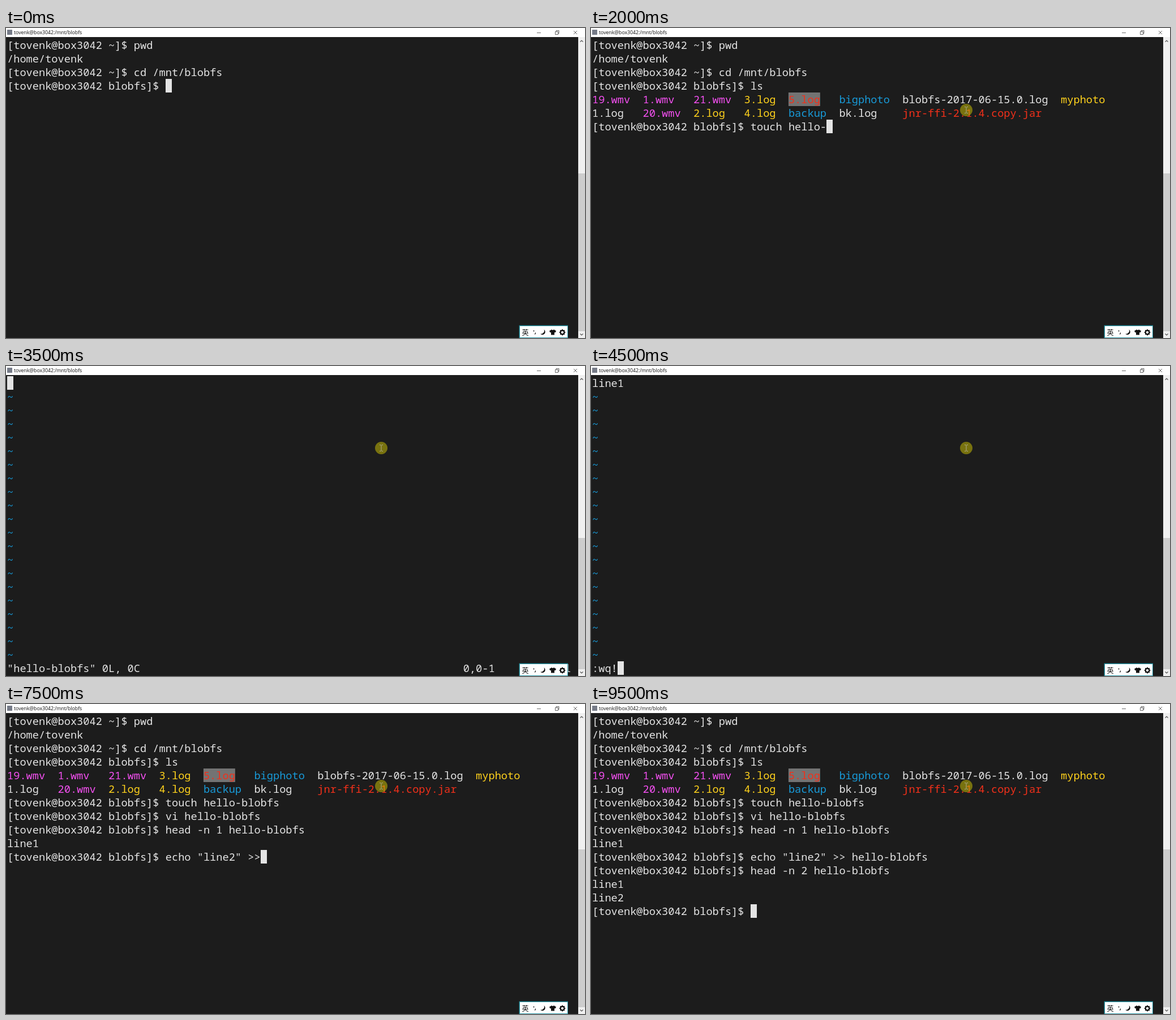
Recreate the animation shown at these times as an HTML page with a canvas. Size 1023 by 548 pixels, loop 10 s.

```html
<!DOCTYPE html>
<html lang="en">
<head>
<meta charset="utf-8">
<title>Terminal session</title>
<style>
html, body { margin: 0; width: 100%; height: 100%; overflow: hidden; background: #1c1c1c; }
canvas { display: block; }
</style>
</head>
<body>
<canvas id="stage" width="1023" height="548"></canvas>
<script>
const ctx = document.getElementById('stage').getContext('2d');

const STEP = 500, LEFT = 2, TOP = 18, CELL = 11.19, ROW = 24;
const FG = '#e4e4e4', BG = '#1c1c1c', PINK = '#f550f2', GOLD = '#ffd21c', BLUE = '#189ad8', RED = '#f2301a';
const HOST = 'tovenk@box3042';
const HOME_PROMPT = `[${HOST} ~]$ `, PROMPT = `[${HOST} blobfs]$ `;

// A row is a string or a list of [column, text, colour, background].
const session = [
  HOME_PROMPT + 'pwd',
  '/home/tovenk',
  HOME_PROMPT + 'cd /mnt/blobfs',
  PROMPT + 'ls',
  [[0, '19.wmv', PINK], [8, '1.wmv', PINK], [16, '21.wmv', PINK], [24, '3.log', GOLD],
   [31, '5.log', RED, '#737373'], [39, 'bigphoto', BLUE], [49, 'blobfs-2017-06-15.0.log'], [74, 'myphoto', GOLD]],
  [[0, '1.log'], [8, '20.wmv', PINK], [16, '2.log', GOLD], [24, '4.log', GOLD],
   [31, 'backup', BLUE], [39, 'bk.log'], [49, 'jnr-ffi-2.1.4.copy.jar', RED]],
  PROMPT + 'touch hello-blobfs',
  PROMPT + 'vi hello-blobfs',
  PROMPT + 'head -n 1 hello-blobfs',
  'line1',
  PROMPT + 'echo "line2" >> hello-blobfs',
  PROMPT + 'head -n 2 hello-blobfs',
  'line1',
  'line2'
];

const shell = (rows, input) => ({ rows, line: PROMPT + input });
const editor = (text, status, ruler, cursor) => ({ text, status, ruler, cursor });

const steps = [
  shell(3, ''),
  shell(6, ''),
  shell(6, ''),
  shell(6, 'touch '),
  shell(6, 'touch hello-'),
  shell(7, ''),
  shell(7, 'vi hello-blobfs'),
  editor('', '"hello-blobfs" 0L, 0C', '0,0-1', [0, 0]),
  editor('line1', '-- INSERT --', '1,6', [5, 0]),
  editor('line1', ':wq!', '', [4, 21]),
  shell(8, 'head -n 1 '),
  { rows: 9, line: '' },
  shell(10, ''),
  shell(10, 'echo '),
  shell(10, 'echo "line2'),
  shell(10, 'echo "line2" >>'),
  shell(10, 'echo "line2" >> hello-blobfs'),
  shell(11, 'head '),
  shell(11, 'head -n 2 hello-blobfs'),
  shell(14, '')
];

function rect(x, y, w, h, color) {
  ctx.fillStyle = color;
  ctx.fillRect(x, y, w, h);
}

function path(d, color, width) {
  const shape = new Path2D(d);
  ctx.lineWidth = width;
  ctx.strokeStyle = ctx.fillStyle = color;
  width ? ctx.stroke(shape) : ctx.fill(shape);
}

function circle(x, y, r, color) {
  ctx.fillStyle = color;
  ctx.beginPath();
  ctx.arc(x, y, r, 0, 2 * Math.PI);
  ctx.fill();
}

function label(text, x, y, font, color) {
  ctx.font = font;
  ctx.fillStyle = color;
  ctx.fillText(text, x, y);
}

function print(col, row, text, color = FG, back) {
  const x = LEFT + col * CELL, y = TOP + row * ROW;
  if (back) rect(x, y, text.length * CELL, ROW, back);
  [...text].forEach((ch, i) =>
    label(ch, x + i * CELL, y + 19, '18.65px "Noto Sans Mono", monospace', color));
}

function cursor(col, row) {
  rect(Math.round(LEFT + col * CELL), TOP + row * ROW, 11, ROW, FG);
}

function drawShell({ rows, line }) {
  session.slice(0, rows).forEach((content, row) => {
    if (typeof content === 'string') print(0, row, content);
    else content.forEach(([col, ...rest]) => print(col, row, ...rest));
  });
  print(0, rows, line);
  cursor(line.length, rows);
}

function drawEditor({ text, status, ruler, cursor: at }) {
  print(0, 0, text);
  for (let row = 1; row <= 20; row++) print(0, row, '~', BLUE);
  print(0, 21, status);
  if (ruler) print(72, 21, ruler.padEnd(14) + 'All');
  cursor(...at);
}

function drawWindow(thumbTop) {
  rect(0, 0, 1023, 16, '#fff');
  rect(2, 3, 9, 9, '#767b88');
  label(HOST + ':/mnt/blobfs', 14, 11, '8.7px "Open Sans", sans-serif', '#111');
  path('M938 8.5h7M970.5 6.5h5v5h-5zM972 6v-1.5h5v5h-1.5M1003 5l6 6M1009 5l-6 6', '#444', 0.8);

  rect(1011, 16, 12, 532, '#f0f0f0');
  rect(1011, thumbTop, 12, 536 - thumbTop, '#cdcdcd');
  path('M1014.5 24.5l2.5-2.5 2.5 2.5M1014.5 540.5l2.5 2.5 2.5-2.5', '#555', 1.2);
}

function drawInputBar() {
  rect(906.6, 525.6, 86.4, 22.4, '#2793a3');
  rect(908, 527, 84, 20, '#fff');
  label('英', 911.5, 542.5, '12px "Noto Sans CJK SC", "Noto Sans CJK", sans-serif', '#111');
  circle(932.5, 535.5, 1, '#111');
  path('M935.5 538.5q.3 1.5-1.2 3', '#111', 1.2);
  path('M950.5 533a5 5 0 1 1-6.5 7.5a5.5 5.5 0 0 0 6.5-7.5z', '#111');
  path('M964 533q2 2 4 0l4 2.5-1.5 3-1.5-.7v4.7h-6v-4.7l-1.5.7-1.5-3z', '#111');
  for (let i = 0; i < 8; i++) {
    const a = i * Math.PI / 4;
    circle(983 + 4.2 * Math.cos(a), 538 + 4.2 * Math.sin(a), 1.2, '#111');
  }
  circle(983, 538, 4.2, '#111');
  circle(983, 538, 2.2, '#fff');
}

function drawPointer() {
  circle(663, 145, 11, 'rgba(206,194,4,.52)');
  path('M660 139.5h2l1 1 1-1h2M663 140.5v9M660 150.5h2l1-1 1 1h2', '#b5b2a0', 0.9);
}

function draw() {
  const index = Math.floor(performance.now() / STEP) % steps.length;
  const step = steps[index];
  const editing = 'status' in step;
  rect(0, 0, 1023, 548, BG);
  editing ? drawEditor(step) : drawShell(step);
  drawWindow(editing ? 304 : 257);
  drawInputBar();
  if (index > 0) drawPointer();
  requestAnimationFrame(draw);
}
draw();
</script>
</body>
</html>
```
